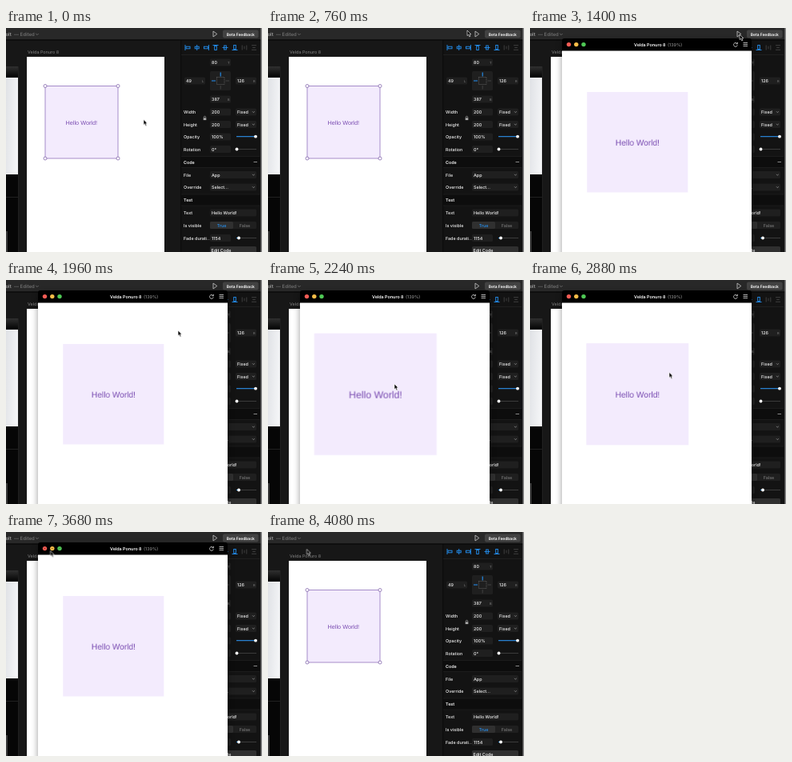
An HTML page that plays this animation: 320 px wide and 280 px high, repeating every 4240 ms.

```html
<!DOCTYPE html>
<html lang="en">
<head>
<meta charset="utf-8">
<title>Prototype preview</title>
<style>
  html, body { margin: 0; width: 100%; height: 100%; overflow: hidden; background: #171717; }
  svg { display: block; width: 320px; height: 280px; }
  text { font: 500 5.4px Inter, "Liberation Sans", sans-serif; fill: #f4f4f4; text-rendering: geometricPrecision; }
  .dim { fill: #777; }
  .bold { font-weight: 600; }
  .hello { font: 7.28px "Liberation Sans", Arial, sans-serif; fill: #7a4db2; text-anchor: middle; }
  .mid { text-anchor: middle; }
  .shadow { filter: drop-shadow(0 3px 4.5px rgba(0, 0, 0, .45)); }

  .window, .card, .cursor, .glyphs { animation: 4240ms infinite; }
  .window { animation-name: window; transform-origin: 158.5px 147px; }
  .card { animation-name: card; transform-origin: 134.3px 142.5px; }
  .cursor { animation-name: cursor; animation-timing-function: ease-in-out; }
  .glyphs { animation-name: glyphs; animation-timing-function: step-end; }

  @keyframes window {
    0%, 31% { opacity: 0; transform: scale(.95); animation-timing-function: step-end; }
    31.1% { opacity: .5; transform: scale(.97); animation-timing-function: ease-out; }
    33%, 93.2% { opacity: 1; transform: none; }
    95.6%, 100% { opacity: 0; transform: scale(.98); }
  }
  @keyframes card {
    0%, 46.9% { transform: scale(1); animation-timing-function: cubic-bezier(.2, .7, .3, 1); }
    52.6%, 62.7% { transform: scale(1.213); animation-timing-function: cubic-bezier(.45, 0, .65, 1); }
    68.9% { transform: scale(1); animation-timing-function: cubic-bezier(.2, .7, .3, 1); }
    73.6%, 81.1% { transform: scale(1.213); animation-timing-function: cubic-bezier(.2, .7, .3, 1); }
    86.3%, 100% { transform: scale(1); }
  }
  @keyframes cursor {
    0%, 8% { transform: translate(172px, 114.5px); }
    12.3%, 17.2% { transform: translate(244px, 2px); }
    17.9% { transform: translate(249px, 3px); }
    26%, 42.9% { transform: translate(262px, 8px); }
    50%, 56.2% { transform: translate(158px, 130px); }
    62.3%, 77.8% { transform: translate(174px, 115.5px); }
    86.3%, 87.2% { transform: translate(55.5px, 23.5px); }
    90.6%, 93.4% { transform: translate(48px, 20px); }
    96%, 100% { transform: translate(48.5px, 21.5px); }
  }
  @keyframes glyphs {
    0% { opacity: 0; }
    86% { opacity: 1; }
    93.4%, 100% { opacity: 0; }
  }
</style>
</head>
<body>
<svg viewBox="0 0 320 280">
  <defs>
    <linearGradient id="pale" y2=".3">
      <stop stop-color="#e0e2e6"/><stop offset="1" stop-color="#f3f4f6"/>
    </linearGradient>
    <linearGradient id="lip" x2="0" y2="1">
      <stop stop-color="#303030"/><stop offset="1" stop-color="#0c0c0c"/>
    </linearGradient>
  </defs>
  <rect width="320" height="280" fill="#171717"/>

  <!-- Canvas -->
  <rect y="48" width="16" height="232" fill="#060606"/>
  <rect y="48" width="15" height="11" fill="url(#lip)"/>
  <rect y="62" width="15" height="121" fill="url(#pale)"/>
  <rect y="254" width="2" height="26" fill="#3a3a3a"/>
  <path d="M0 211.5H15M15.5 48V280" stroke="#2c2c2c" fill="none" stroke-width=".7"/>
  <text x="27" y="32" class="dim">Velda Ponuro 8</text>
  <rect x="26" y="36" width="172" height="244" fill="#fff"/>
  <rect x="49" y="72.5" width="91" height="90.5" fill="#f3ebfd" stroke="#9d82c4" stroke-width=".9"/>
  <g fill="#fff" stroke="#8468ad" stroke-width=".8">
    <circle cx="49" cy="72.5" r="2"/><circle cx="140" cy="72.5" r="2"/>
    <circle cx="49" cy="163" r="2"/><circle cx="140" cy="163" r="2"/>
  </g>
  <text x="94.3" y="120.6" class="hello">Hello World!</text>

  <!-- Inspector, filled by script -->
  <g id="panel"></g>

  <!-- Toolbar -->
  <rect width="320" height="14.5" fill="#282828"/>
  <path d="M0 15H320" stroke="#050505"/>
  <text x="-.5" y="10" style="font-size:6px;fill:#aaa">olt</text>
  <text x="10" y="10" class="dim" style="font-size:6px">— Edited</text>
  <path d="M37.3 7l1.7 1.7L40.7 7" fill="none" stroke="#777" stroke-width=".8"/>
  <path d="M259 4l4.800 3.500-4.800 3.500z" fill="none" stroke="#ccc" stroke-width=".8" stroke-linejoin="round"/>
  <rect x="271" y="2.500" width="44.500" height="10" rx="2" fill="#424242"/>
  <text x="293.300" y="9.500" class="bold mid" style="font-size:4.900px;fill:#fff">Beta Feedback</text>
  <rect x="318.500" width="1.500" height="280" fill="#8c8c8c"/>

  <!-- Preview window -->
  <g class="window">
    <rect class="shadow" x="40.500" y="14" width="236" height="286" rx="3"/>
    <path d="M40 29V16q0-3 3-3H274q3 0 3 3V29z" fill="#000"/>
    <rect x="40" y="28.500" width="237" height="271.500" fill="#fff"/>
    <circle cx="48.500" cy="20.600" r="2.700" fill="#f65c55"/>
    <circle cx="57.800" cy="20.600" r="2.700" fill="#f8bd48"/>
    <circle cx="67" cy="20.600" r="2.700" fill="#4fc955"/>
    <path class="glyphs" d="M47.500 19.600l2 2m0-2l-2 2M56.600 20.600h2.400M66 21.600l2-2"
      stroke="#5b2b10" stroke-width=".5" fill="none"/>
    <text x="169.500" y="22.800" class="bold" text-anchor="end" style="fill:#fff">Velda Ponuro 8</text>
    <text x="172" y="22.800" style="fill:#888">(139%)</text>
    <path d="M258.800 19.400a2.400 2.400 0 1 0 .5 2M259.400 17.800v2h-2M266.500 18.500h5.500m-5.500 2h5.500m-5.500 2h5.500"
      fill="none" stroke="#ddd" stroke-width=".8"/>
    <g class="card">
      <rect x="71.200" y="80" width="126.200" height="125.500" fill="#f3ebfd"/>
      <text x="134.400" y="146.500" class="hello" style="font-size:10.150px">Hello World!</text>
    </g>
  </g>

  <path class="cursor" d="M0 0V6.600L1.500 5.200 2.700 7.900 3.900 7.400 2.800 4.800H4.800Z"
    fill="#000" stroke="#fff" stroke-width=".6"/>
</svg>

<script>
  const BLUE = '#2492f5', FIELD = '#1f1f1f';
  const rect = (x, y, w, h, fill, extra = '') =>
    `<rect x="${x}" y="${y}" width="${w}" height="${h}" fill="${fill}" ${extra}/>`;
  const line = (d, color, width = 0.8, extra = '') =>
    `<path d="${d}" stroke="${color}" stroke-width="${width}" fill="none" ${extra}/>`;
  const label = (x, y, s, cls = '') => `<text x="${x}" y="${y + 2}" class="${cls}">${s}</text>`;

  const field = (x, y, w, s, unit = '') =>
    rect(x, y - 4.5, w, 9, FIELD, 'rx="1.5"') + label(x + 2, y, s) +
    (unit && `<text x="${x + w - 4}" y="${y + 1.5}" class="dim" style="font-size:4px">${unit}</text>`);
  const menu = (x, y, w, s) =>
    field(x, y, w, s) + line(`M${x + w - 5} ${y - .7}l1.4 1.4 1.4-1.4`, '#aaa', .7);
  const slider = (y, knob) =>
    line(`M288 ${y}H313`, '#3b3b3b', 1) + line(`M288 ${y}H${knob}`, BLUE, 1) +
    `<circle cx="${knob}" cy="${y}" r="1.9" fill="#fff"/>`;
  const section = (y, s, mark = '') =>
    rect(219, y - 7, 98.5, 14, '#0d0d0d') + line(`M219 ${y - 7}H317M219 ${y + 7}H317`, '#222', .7) +
    label(222, y, s, 'bold') + (mark && line(`M309.5 ${y}H314`, '#aaa', .8));

  // Alignment marks: a guide with a hollow block, turned for the vertical set
  const align = (x, edge, turn) =>
    `<g transform="translate(${x} 24.5) rotate(${turn})">` +
    line(`M${edge} -3.5V3.5`, BLUE, .9) +
    rect(edge < 0 ? -2 : edge > 0 ? -3 : -2.5, -1.3, 5, 2.6, 'none', `stroke="${BLUE}" stroke-width=".9"`) + '</g>';
  const spread = (x, turn) =>
    `<g transform="translate(${x} 24.5) rotate(${turn})">` +
    line('M-2.8 -3V3M2.8 -3V3M0 -1.8V1.8', '#444', .9) + '</g>';

  const icons = [-3, 0, 3].map((edge, i) =>
    align(227 + i * 11.7, edge, 0) + align(262 + i * 12, edge, 90)).join('') +
    spread(298, 0) + spread(310, 90);

  const pins =
    rect(255, 54, 26, 24, FIELD, 'rx="1.5"') +
    rect(263.5, 61.5, 9.5, 9, 'none', 'stroke="#777" stroke-width=".7" stroke-dasharray="1 1"') +
    line('M268.2 55.5V60.5M257 66H262', BLUE, 1.1) +
    line('M268.2 72V76.5M274.5 66H279', '#4a4a4a', .8);

  const rows = [['Width', 105], ['Height', 120.5], ['Opacity', 136], ['Rotation', 151.5], ['File', 183.5],
    ['Override', 199], ['Text', 231], ['Is visible', 246.5], ['Fade durati…', 262.5]];

  document.getElementById('panel').innerHTML =
    rect(219, 15, 101, 265, '#131313') +
    line('M218.7 15V280', '#080808') + line('M219 33.5H317', '#262626', .7) + icons +
    field(255, 43, 26, '80', 'T') + field(223, 66, 26, '49', 'L') + pins +
    field(287, 66, 26, '126', 'R') + field(255, 89, 26, '387', 'B') +
    rows.map(([s, y]) => label(222, y, s)).join('') +
    field(255, 105, 26, '200') + menu(287, 105, 26, 'Fixed') +
    field(255, 120.5, 26, '200') + menu(287, 120.5, 26, 'Fixed') +
    line('M247.3 112.5v-1a1.2 1.2 0 0 1 2.4 0v1', '#aaa', .7) + rect(246.7, 112.4, 3.6, 2.7, '#aaa') +
    field(255, 136, 26, '100%') + slider(135.7, 312) +
    field(255, 151.5, 26, '0°') + slider(151.5, 288.5) +
    section(167.5, 'Code', '-') +
    menu(255, 183.5, 58, 'App') + menu(255, 199, 58, 'Select…') +
    section(215, 'Test') +
    field(255, 231, 58, 'Hello World!') +
    rect(255, 242, 58, 9, FIELD, 'rx="1.5"') + rect(255, 242, 29, 9, '#303030', 'rx="1.5"') +
    `<text x="269.5" y="248.5" class="mid" style="fill:${BLUE}">True</text>` +
    label(298.5, 246.5, 'False', 'dim mid') +
    field(255, 262.5, 26, '1154') + slider(262.5, 291) +
    rect(255, 273, 58, 9, '#303030', 'rx="1.5"') + label(269, 277.5, 'Edit Code', 'mid');
</script>
</body>
</html>
```
